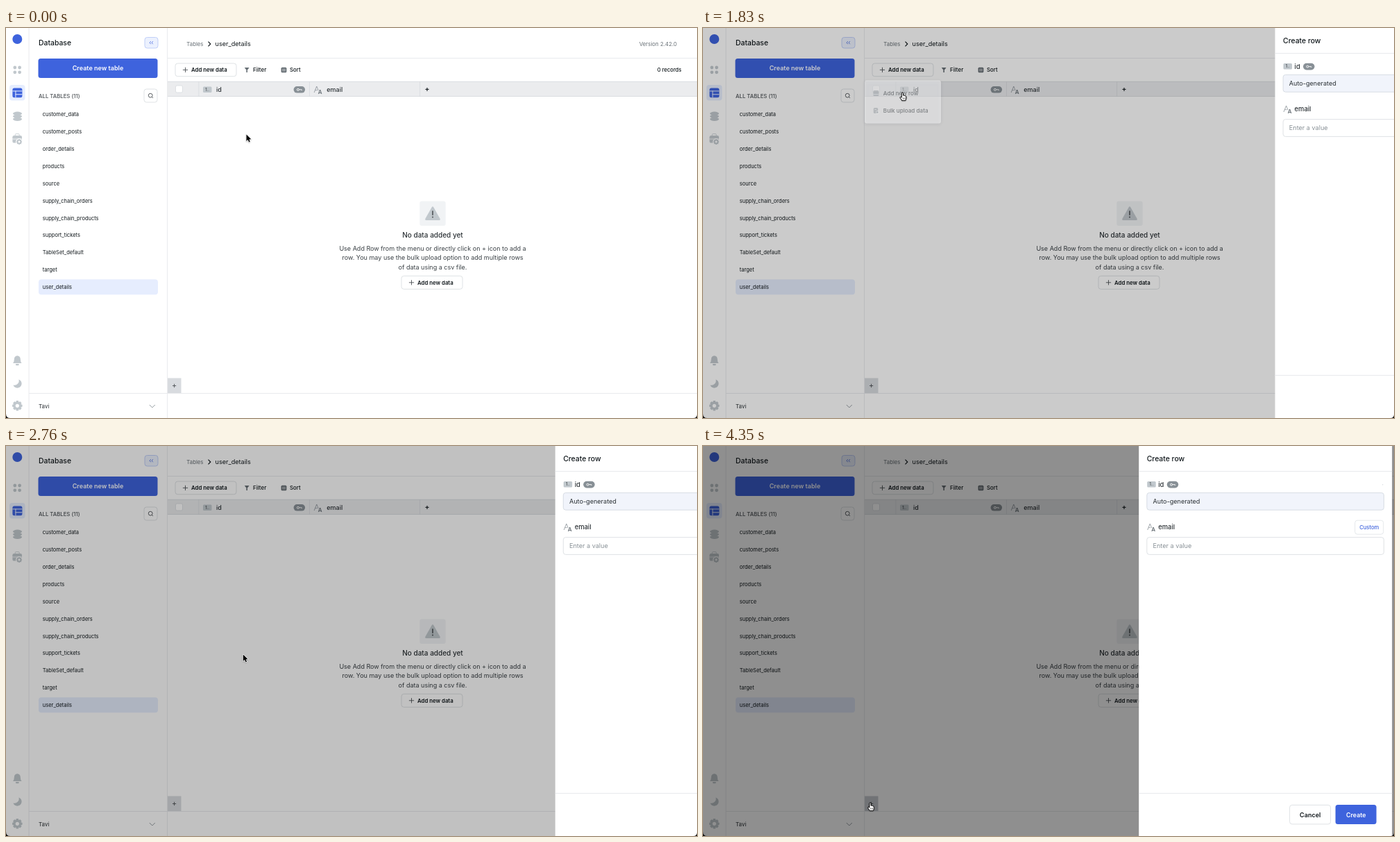
Animation of 996 by 562 pixels, one loop 4620 ms. Source, as an HTML page with a canvas:

```html
<!DOCTYPE html>
<html lang="en">
<head>
<meta charset="utf-8">
<title>Database table</title>
<style>
html, body { margin: 0; width: 100%; height: 100%; overflow: hidden; background: #fff; }
canvas { display: block; width: 996px; height: 562px; }
</style>
</head>
<body>
<canvas id="stage"></canvas>
<script>
const W = 996, H = 562, LOOP = 4620, STEP = 30;
const FONT = 'Inter, "Noto Sans", sans-serif';
const BLUE = '#3e63dd', INK = '#11181c', TEXT = '#2b3135', SOFT = '#687076';
const ICON = '#c1c8cd', LINE = '#e6e8eb', EDGE = '#d7dbdf', DIM = 0.44;
const canvas = document.getElementById('stage');
const c = canvas.getContext('2d');
const dpr = window.devicePixelRatio || 1;
canvas.width = W * dpr;
canvas.height = H * dpr;

// ---- drawing helpers ----
function txt(s, x, y, size, weight = 400, color = TEXT, align = 'left') {
  c.font = `${weight} ${size}px ${FONT}`;
  c.fillStyle = color;
  c.textAlign = align;
  c.fillText(s, x, y + size * 0.36);
}
function rect(x, y, w, h, color) {
  c.fillStyle = color;
  c.fillRect(x, y, w, h);
}
function box(x, y, w, h, r, fill, edge) {
  c.beginPath();
  c.roundRect(x, y, w, h, r);
  if (fill) { c.fillStyle = fill; c.fill(); }
  if (edge) { c.strokeStyle = edge; c.lineWidth = 0.8; c.stroke(); }
}
function disc(x, y, r, color) {
  c.beginPath();
  c.arc(x, y, r, 0, Math.PI * 2);
  c.fillStyle = color;
  c.fill();
}
function poly(points, fill, stroke, width = 1) {
  c.beginPath();
  for (let i = 0; i < points.length; i += 2) c.lineTo(points[i], points[i + 1]);
  if (fill) { c.closePath(); c.fillStyle = fill; c.fill(); }
  if (stroke) { c.strokeStyle = stroke; c.lineWidth = width; c.stroke(); }
}
function plus(x, y, r, color, width = 1) {
  poly([x - r, y, x + r, y], null, color, width);
  poly([x, y - r, x, y + r], null, color, width);
}

// ---- icons ----
function gear(x, y, r, color, hole) {
  c.save();
  c.translate(x, y);
  for (let i = 0; i < 4; i++) {
    box(-r * 0.26, -r, r * 0.52, r * 2, r * 0.12, color);
    c.rotate(Math.PI / 4);
  }
  c.restore();
  disc(x, y, r * 0.8, color);
  disc(x, y, r * 0.36, hole);
}
function keyBadge(x, y) {
  box(x, y, 16.5, 9.6, 4.8, '#889096');
  c.beginPath();
  c.arc(x + 6.3, y + 4.8, 1.5, 0, Math.PI * 2);
  c.strokeStyle = '#fff';
  c.lineWidth = 0.9;
  c.stroke();
  poly([x + 7.8, y + 4.8, x + 11.6, y + 4.8, x + 11.6, y + 6.2], null, '#fff', 0.9);
}
function numberIcon(x, y) {
  box(x, y, 12.5, 8.5, 1.5, ICON);
  txt('1..', x + 6.2, y + 4.2, 5.5, 600, '#4c5155', 'center');
}
function textIcon(x, y) {
  poly([x, y + 9, x + 3.6, y, x + 6, y + 6], null, '#889096', 0.8);
  poly([x + 1.4, y + 5.6, x + 4.6, y + 5.6], null, '#889096', 0.7);
  txt('A', x + 8.5, y + 8, 8, 600, '#687076', 'center');
}
function addButton(x, y, w, h, fill) {
  box(x, y, w, h, 3.5, fill, EDGE);
  plus(x + 14.5, y + h / 2, 3.6, '#4c5155', 0.9);
}

function rail() {
  disc(16.3, 16, 7, BLUE);
  for (const [x, y] of [[12.8, 57], [19.6, 57], [12.8, 63.8], [19.6, 63.8]]) disc(x, y, 2.4, ICON);

  box(5, 82, 22.5, 22.5, 4, '#e6edfe');
  box(9.4, 86.6, 14, 13.6, 2.5, BLUE);
  rect(9.4, 90.4, 14, 1, '#e6edfe');
  rect(13.4, 90.4, 1, 9.8, '#e6edfe');
  rect(13.4, 95.2, 10, 1, '#e6edfe');

  for (let i = 2; i >= 0; i--) {
    const y = 123 + i * 4;
    for (const [dy, color] of [[1.3, '#fff'], [0, ICON]]) {
      c.beginPath();
      c.ellipse(16.5, y - dy + 0.3, 6.4, 2.7, 0, 0, Math.PI * 2);
      c.fillStyle = color;
      c.fill();
    }
  }

  box(13.2, 152.6, 6, 4, 1.2, null, ICON);
  box(9.4, 155, 13.6, 10.6, 2.2, ICON);
  rect(9.4, 159.6, 13.6, 0.8, '#fff');
  disc(19, 164, 4.9, '#fff');
  gear(19, 164, 4, ICON, '#fff');

  c.fillStyle = ICON;
  c.fill(new Path2D('M10 483 Q11.8 481 11.8 477.5 Q11.9 472.4 16.3 472.2 Q20.7 472.4 20.8 477.5 Q20.8 481 22.6 483 Z'));
  box(13.8, 484, 5, 2.2, 1.1, ICON);
  c.fillStyle = ICON;
  c.fill(new Path2D('M18.4 506.4 A6.3 6.3 0 1 1 10.4 514.6 A6.6 6.6 0 0 0 18.4 506.4 Z'));
  gear(16.3, 544.3, 7.2, ICON, '#fff');
}

function sidebar() {
  txt('Database', 47, 21.6, 10.4, 500, INK);
  box(200, 13.5, 19, 15.5, 3.5, '#ecf1fe', '#b4c6f6');
  for (const x of [208, 211]) poly([x + 0.8, 19.2, x - 1, 21.2, x + 0.8, 23.2], null, BLUE, 0.8);
  box(46.5, 44, 172, 28, 3.5, BLUE);
  txt('Create new table', 132.5, 58.2, 9.03, 600, '#fff', 'center');
  txt('ALL TABLES (11)', 47, 98, 7.75, 500, '#4c5155');
  box(199, 88, 19, 19, 3.5, '#fff', EDGE);
  c.beginPath();
  c.arc(208.2, 97.2, 2.9, 0, Math.PI * 2);
  c.strokeStyle = '#4c5155';
  c.lineWidth = 0.9;
  c.stroke();
  poly([210.3, 99.3, 212, 101], null, '#4c5155', 0.9);

  box(47, 362.3, 172, 22, 4, '#e6edfe');
  ['customer_data', 'customer_posts', 'order_details', 'products', 'source',
    'supply_chain_orders', 'supply_chain_products', 'support_tickets',
    'TableSet_default', 'target', 'user_details'
  ].forEach((name, i) => txt(name, 52.8, 124.4 + i * 24.9, 7.5, 400, INK));

  txt('Tavi', 47, 545, 8, 400, TEXT);
  poly([206.8, 543, 210.8, 547, 214.8, 543], null, '#889096', 0.9);
}

function tableArea(menuOpen, plusHover) {
  txt('Tables', 260.3, 23.3, 7.8, 400, SOFT);
  poly([291.5, 19.6, 294.8, 23, 291.5, 26.4], null, INK, 1.2);
  txt('user_details', 301.6, 23.2, 9.1, 400, INK);
  txt('Version 2.42.0', 967, 23.3, 7.9, 400, SOFT, 'right');
  rect(233, 43, W - 233, 0.9, LINE);

  addButton(244, 51, 88, 18.7, menuOpen ? '#e6e8eb' : '#fff');
  txt('Add new data', 267, 60.5, 7.8, 600, INK);
  poly([343.8, 57, 350.6, 57, 348, 60.4, 348, 64, 346.4, 64, 346.4, 60.4], SOFT);
  txt('Filter', 356, 60.5, 8, 500, INK);
  box(396.6, 56.8, 7.8, 7.4, 1.5, SOFT);
  poly([399.3, 62.5, 399.3, 58.6], null, '#fff', 0.8);
  poly([401.8, 62.5, 401.8, 58.6], null, '#fff', 0.8);
  txt('Sort', 409, 60.5, 7.8, 500, INK);
  txt('0 records', 973.6, 60.5, 7.65, 500, INK, 'right');

  rect(233, 77, W - 233, 22, '#ebecee');
  rect(233, 76.8, W - 233, 0.8, EDGE);
  rect(233, 98.2, W - 233, 0.8, EDGE);
  for (const x of [277.5, 437, 596.3]) rect(x, 77, 0.8, 22, EDGE);
  box(244.5, 83, 10, 10, 2, '#fff', EDGE);
  numberIcon(284, 84.4);
  txt('id', 303, 88.4, 9, 500, TEXT);
  keyBadge(414.6, 84);
  textIcon(444.2, 84);
  txt('email', 462.3, 88.4, 9, 500, TEXT);
  plus(607, 88.4, 2.5, INK, 1.1);

  box(596.3, 249.5, 37.4, 35.5, 3, '#f1f3f5');
  c.fillStyle = ICON;
  c.fill(new Path2D('M613.6 258.4 Q615 256.2 616.4 258.4 L625.6 274.8 Q626.4 277 624.4 277 L605.6 277 Q603.6 277 604.4 274.8 Z'));
  rect(614.2, 263.4, 1.6, 6.4, '#4c5155');
  disc(615, 272.6, 1, '#4c5155');
  txt('No data added yet', 615, 298.6, 10, 500, TEXT, 'center');
  ['Use Add Row from the menu or directly click on + icon to add a',
    'row. You may use the bulk upload option to add multiple rows',
    'of data using a csv file.'
  ].forEach((line, i) => txt(line, 615, 317.3 + i * 13.9, 9.03, 400, '#3a4045', 'center'));
  addButton(570, 357.3, 88, 19, '#fff');
  txt('Add new data', 593, 367, 7.8, 600, INK);

  rect(233, 504.5, 19.5, 21.5, plusHover ? '#c8cdd2' : '#d8dbdf');
  plus(242.6, 515.5, 2.6, '#4c5155', 0.9);
}

function menu(alpha) {
  c.save();
  c.globalAlpha = alpha;
  c.shadowColor = 'rgba(16,24,40,.2)';
  c.shadowBlur = 5 * dpr;
  c.shadowOffsetY = dpr;
  box(233, 75.5, 110, 62, 3, '#fff');
  c.shadowColor = 'transparent';
  box(245.4, 90, 8, 8, 1.5, '#889096');
  rect(245.4, 95, 8, 0.8, '#fff');
  txt('Add new row', 259.8, 94.2, 8.1, 500, INK);
  box(245.8, 115, 6.4, 8, 1.5, '#889096');
  rect(247.2, 117, 2.8, 0.8, '#fff');
  disc(251.4, 121.4, 2.3, '#fff');
  disc(251.4, 121.4, 1.6, '#889096');
  txt('Bulk upload data', 259.8, 119, 8.15, 500, INK);
  c.restore();
}

function panel(p) {
  c.save();
  c.translate(628 + 368 * (1 - p), 0);
  rect(0, 0, 365, H, '#fff');
  rect(0, 36, 365, 0.9, LINE);
  rect(0, 500, 365, 0.9, LINE);
  txt('Create row', 11.5, 18.4, 10.4, 500, INK);

  numberIcon(12, 51);
  txt('id', 28, 55.4, 9.4, 500, TEXT);
  keyBadge(40.5, 50.8);
  disc(351.5, 55.8, 0.7, EDGE);
  box(11.6, 67.4, 341.6, 24.8, 3.5, '#f1f4fb', '#d0d6de');
  txt('Auto-generated', 20.3, 80, 9.09, 400, TEXT);

  textIcon(12.5, 112);
  txt('email', 28, 116.4, 9.4, 500, TEXT);
  box(311.5, 107.2, 41, 20, 3.5, '#fff', '#dfe3e6');
  txt('Custom', 332, 117.5, 7.6, 500, BLUE, 'center');
  box(11.6, 131.6, 341.6, 24.8, 3.5, '#fff', EDGE);
  txt('Enter a value', 20.3, 144.2, 9.1, 400, '#889096');

  box(217.4, 517.4, 59, 27.5, 3.5, '#fff', EDGE);
  txt('Cancel', 247, 531.4, 9, 600, INK, 'center');
  box(283.4, 517, 59, 28, 3.5, BLUE);
  txt('Create', 313, 531.4, 8.9, 600, '#fff', 'center');
  c.restore();
}

// ---- pointer ----
const ARROW = new Path2D('M0 0 V9.6 L2.2 7.6 L3.7 11 L5.3 10.3 L3.9 7 L6.8 6.8 Z');
const HAND = new Path2D('M-1 1.2 Q-1 0 0 0 Q1 0 1 1.2 V4.2 Q2.3 3.6 2.6 4.6 Q3.8 4.1 4.1 5.1 Q5.3 4.9 5.3 6.2 V8.5 Q5.2 9.8 4.4 11.6 H-.8 Q-1.2 10.2 -2.6 8.6 Q-4 6.9 -3 6.3 Q-2.1 6 -1 7.2 Z');
const PATH = [
  [0, 346.5, 153.5], [30, 348, 151], [130, 400, 96], [220, 288, 60], [340, 118, 102],
  [420, 138, 112], [780, 138, 112], [900, 312, 61], [960, 314, 58], [1110, 314, 58],
  [1260, 298, 80], [1410, 273, 92], [1530, 287.5, 93], [2190, 287.5, 93], [2400, 341.8, 300.5],
  [3000, 341.8, 300.5], [3150, 307.7, 440.5], [3210, 300.5, 471], [3480, 258, 515],
  [3600, 244, 521], [3750, 241, 514], [LOOP, 241, 514]
];
function pointerAt(t) {
  let i = 0;
  while (i < PATH.length - 2 && t >= PATH[i + 1][0]) i++;
  const a = PATH[i], b = PATH[i + 1], d = b[0] - a[0], u = (t - a[0]) / d;
  const slope = (k, axis) => {
    const p = PATH[k - 1], q = PATH[k], n = PATH[k + 1];
    if (!p || !n) return 0;
    const s0 = (q[axis] - p[axis]) / (q[0] - p[0]), s1 = (n[axis] - q[axis]) / (n[0] - q[0]);
    return s0 * s1 > 0 ? 2 * s0 * s1 / (s0 + s1) : 0;
  };
  return [1, 2].map(k => {
    const e = u * u * (3 - 2 * u);
    return a[k] + (b[k] - a[k]) * e +
      d * u * (1 - u) * (slope(i, k) * (1 - u) - slope(i + 1, k) * u);
  });
}
function pointer(t) {
  const [x, y] = pointerAt(t);
  const hand = (t >= 210 && t < 270) || (t >= 870 && t < 2220) || t >= 3600;
  c.save();
  c.translate(x, y);
  c.lineJoin = 'round';
  c.lineWidth = hand ? 0.9 : 1.4;
  c.strokeStyle = hand ? '#111' : '#fff';
  c.fillStyle = hand ? '#fff' : '#000';
  c.shadowColor = 'rgba(0,0,0,.3)';
  c.shadowBlur = 1.5 * dpr;
  c.shadowOffsetY = 0.6 * dpr;
  const shape = hand ? HAND : ARROW;
  c.stroke(shape);
  c.shadowColor = 'transparent';
  c.fill(shape);
  if (hand) {
    c.stroke(shape);
    for (const k of [0.6, 2.1, 3.6]) poly([k, 7.4, k, 9.8], null, '#111', 0.5);
  }
  c.restore();
}

// ---- timing ----
const clamp = v => Math.max(0, Math.min(1, v));
// cubic-bezier(.25, .1, .25, 1)
function ease(x) {
  if (x <= 0 || x >= 1) return clamp(x);
  let lo = 0, hi = 1;
  for (let i = 0; i < 24; i++) {
    const s = (lo + hi) / 2;
    if (0.75 * s * (1 - s) + s ** 3 < x) lo = s; else hi = s;
  }
  return 0.3 * lo * (1 - lo) ** 2 + 3 * lo * lo * (1 - lo) + lo ** 3;
}
function slide(t) {
  if (t < 2700) return ease((t - 1747) / 300);
  if (t < 4110) return 1 - ease((t - 2680) / 300);
  return ease((t - 4060) / 300);
}

function draw(t) {
  const p = slide(t);
  c.setTransform(dpr, 0, 0, dpr, 0, 0);
  rect(0, 0, W, H, '#fff');
  rail();
  rect(32.6, 0, 0.9, H, LINE);
  sidebar();
  tableArea(t >= 240 && t < 1740, t >= 3600);
  rect(232.2, 0, 0.9, H, LINE);
  rect(33, 526, W - 33, 0.9, LINE);
  if (p > 0) {
    rect(0, 0, W, H, `rgba(0,0,0,${DIM * p})`);
    panel(p);
  }
  const fade = clamp((t - 210) / 90) * clamp(1 - (t - 1747) / 150);
  if (fade > 0) menu(fade);
  pointer(t);
  c.fillStyle = '#000';
  c.fill(new Path2D(`M0 ${H - 6} Q0 ${H} 6 ${H} H0 Z M${W} ${H - 5} Q${W} ${H} ${W - 5} ${H} H${W} Z`));
}

const start = performance.now();
function tick() {
  const t = (performance.now() - start) % LOOP;
  draw(Math.floor(t / STEP) * STEP);
  requestAnimationFrame(tick);
}
tick();
</script>
</body>
</html>
```
